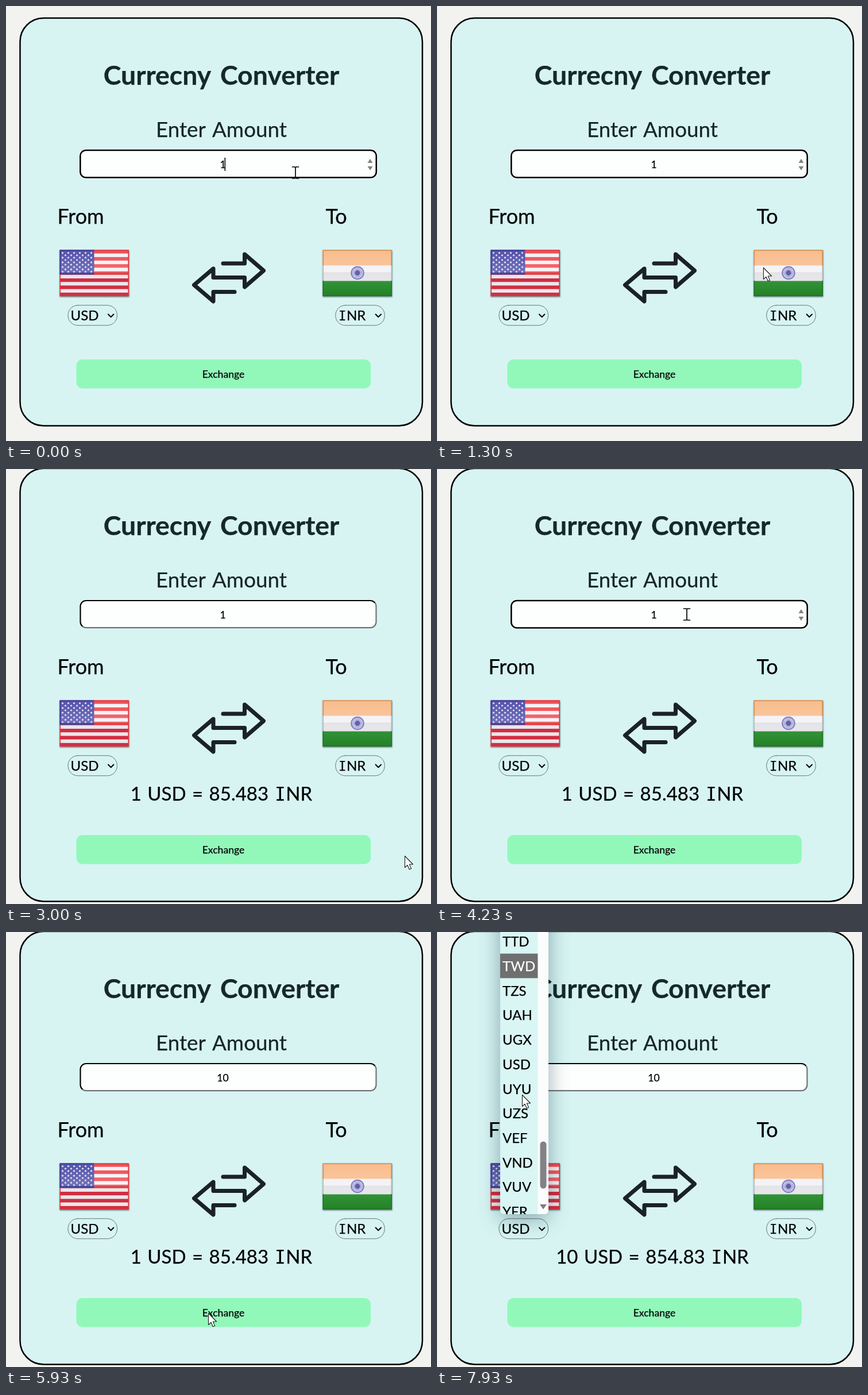
An HTML page that plays this animation: 740x757 px, repeating every 8 s.

```html
<!DOCTYPE html>
<html lang="en">
<head>
<meta charset="utf-8">
<title>Currency converter</title>
<style>
html, body { margin: 0; width: 100%; height: 100%; overflow: hidden; background: #f2f2f0; }
svg { display: block; width: 740px; height: 757px; }
text { font-family: Lato, "Open Sans", sans-serif; font-size: 24px; fill: #000; stroke: #000; stroke-width: .25px; stroke-linejoin: round; white-space: pre; }
.mid { text-anchor: middle; }
.title { font-size: 46.4px; font-weight: 700; word-spacing: .12em; fill: #16282c; stroke: #16282c; }
.label { font-size: 36.8px; word-spacing: .1em; fill: #16242a; stroke: #16242a; }
.side { font-size: 36px; }
.small { font-size: 17.6px; }
.result { font-size: 33px; word-spacing: .06em; }
.serif { font-family: "Noto Sans Mono", "DejaVu Sans Mono", monospace; }
.line { fill: none; stroke-linecap: round; stroke-linejoin: round; }
#popup { filter: drop-shadow(0 8px 18px rgba(0, 40, 50, .38)); }
</style>
</head>
<body>
<svg viewBox="0 0 740 757" xmlns="http://www.w3.org/2000/svg">
  <defs>
    <linearGradient id="gloss" x1="0" y1="0" x2="0" y2="1">
      <stop offset="0" stop-color="#fff" stop-opacity=".05"/>
      <stop offset=".48" stop-color="#fff" stop-opacity=".22"/>
      <stop offset=".5" stop-color="#000" stop-opacity=".05"/>
      <stop offset="1" stop-color="#000" stop-opacity=".03"/>
    </linearGradient>
    <linearGradient id="green" x1="0" y1="0" x2="0" y2="1">
      <stop offset="0" stop-color="#35993a"/>
      <stop offset="1" stop-color="#238526"/>
    </linearGradient>
    <filter id="soft" x="-10%" y="-10%" width="120%" height="120%"><feGaussianBlur stdDeviation="1.3"/></filter>
    <clipPath id="listClip"><rect x="110" y="-300" width="84" height="791" rx="7"/></clipPath>
  </defs>

  <g id="page">
    <rect id="card" x="24.5" y="21" width="700.5" height="709.5" rx="41" fill="#d7f4f3" stroke="#000" stroke-width="2.5"/>
    <text class="title mid" x="375" y="137">Currecny Converter</text>
    <text class="label mid" x="375" y="228">Enter Amount</text>

    <g id="focused">
      <rect x="127.2" y="248.7" width="519.8" height="52" rx="12" fill="#fff"/>
      <rect x="129.3" y="251" width="515.5" height="47.5" rx="10" fill="#fdfffe" stroke="#000" stroke-width="2.6"/>
    </g>
    <g id="blurred">
      <rect x="128.5" y="250" width="517" height="49" rx="11" fill="#fdfffe"/>
      <path class="line" stroke="#6f7372" stroke-width="2.2" d="M132.5 295.2A10 10 0 0 0 139.5 298.1H634.5A10 10 0 0 0 644.5 288.1V261A10 10 0 0 0 641.6 254"/>
      <path class="line" stroke="#000" stroke-width="2.2" d="M132.5 295.2A10 10 0 0 1 129.5 288.1V261A10 10 0 0 1 139.5 251H634.5A10 10 0 0 1 641.6 254"/>
    </g>
    <path id="spinner" fill="#838383" d="M629.5 273l4.5-7 4.5 7zM629.5 279l4.5 7 4.5-7z"/>
    <text id="amount" class="small mid" x="377.5" y="281.5"></text>
    <rect id="caret" y="264" width="1.6" height="23"/>

    <text class="side" x="89.5" y="379">From</text>
    <text class="side" x="556.5" y="379">To</text>

    <g id="us" transform="translate(93.5 424.5)">
      <rect x="0" y="1" width="121" height="81" fill="#3c4a50" opacity=".75" filter="url(#soft)"/>
      <rect width="120.5" height="80.5" fill="#f4f1f4"/>
      <g id="stripes"></g>
      <rect width="60" height="43" fill="#4a49a6"/>
      <g id="stars" fill="#eef0fa"></g>
      <rect width="120.5" height="80.5" fill="url(#gloss)"/>
      <path class="line" stroke="#38389a" stroke-width="1.6" d="M60 .8H.8V43"/>
      <path class="line" stroke="#e0353f" stroke-width="1.6" d="M60 .8H119.7V79.7H.8V43"/>
    </g>

    <g transform="translate(551.5 424.5)">
      <rect x="0" y="1" width="121" height="81" fill="#3c4a50" opacity=".75" filter="url(#soft)"/>
      <rect width="120.5" height="80.5" fill="#f1f1f5"/>
      <rect width="120.5" height="27" fill="#f8b987"/>
      <rect y="54" width="120.5" height="26.5" fill="url(#green)"/>
      <rect width="120.5" height="80.5" fill="url(#gloss)"/>
      <circle cx="60.5" cy="40" r="10.8" fill="#d9d9ee" stroke="#7d7dc0" stroke-width="2"/>
      <g id="spokes" stroke="#8c8cc8" stroke-width=".8"></g>
      <circle cx="60.5" cy="40" r="4.4" fill="#6060ad"/>
      <path class="line" stroke="#d68a4f" stroke-width="1.6" d="M.8 27V.8H119.7V27"/>
      <path class="line" stroke="#b9bbc2" stroke-width="1.6" d="M.8 28V53M119.7 28V53"/>
      <path class="line" stroke="#207523" stroke-width="1.6" d="M.8 54V79.7H119.7V54"/>
    </g>

    <path class="line" stroke="#1b2225" stroke-width="7" d="M378 448H415.5V432L448.5 460.5 415.5 489V472.5H361V457L327.5 485.5 361 514V497.5H398"/>

    <g id="selects" class="line" stroke="#000">
      <rect x="108" y="520.8" width="85.5" height="35" rx="17" stroke="#667573"/>
      <rect x="573.8" y="520.8" width="85.5" height="35" rx="17" stroke="#667573"/>
      <path stroke-width="2" d="M178 536.5l4.7 4.7 4.7-4.7M643.6 536.5l4.7 4.7 4.7-4.7"/>
    </g>
    <text x="112.5" y="547">USD</text>
    <text x="578.5" y="547"><tspan class="serif">I</tspan>NR</text>

    <text id="result" class="result mid" x="375" y="599"><tspan id="sum"></tspan><tspan class="serif">I</tspan>NR</text>
    <g id="low">
      <rect x="122.5" y="615" width="512.5" height="50.5" rx="11" fill="#92f8ba"/>
      <text class="small mid" x="378.5" y="646.5">Exchange</text>
    </g>
  </g>

  <g id="popup">
    <g clip-path="url(#listClip)">
      <rect x="110" y="-300" width="84" height="800" fill="#d9f5f4"/>
      <rect id="hover" x="110" width="66" height="42.7" fill="#6f6f6f"/>
      <g id="items"></g>
      <rect x="175.5" y="-300" width="19" height="800" fill="#fbfdfc"/>
      <rect id="thumb" x="179.5" width="11" height="82" rx="5.5" fill="#828287"/>
      <path fill="#7c7c80" d="M179 474h12l-6 8.5z"/>
    </g>
  </g>

  <path id="arrow" fill="#fff" stroke="#1a1a1a" stroke-width="1.1" stroke-linejoin="round" d="M.5 .5V20.5L5 16.3 8.3 23.8 11.6 22.4 8.4 15H14.6Z"/>
  <path id="beam" class="line" stroke="#000" stroke-width="1.7" d="M-5.5-10H-1.5L0-9 1.5-10H5.5M0-9V9M-5.5 10H-1.5L0 9 1.5 10H5.5"/>
</svg>
<script>
const LOOP = 8000;
const CLICK_1 = 2250, RESULT_1 = 2640, REFOCUS = 3430, TYPE_ZERO = 4500;
const CLICK_2 = 5890, RESULT_2 = 6300, OPEN_LIST = 7100, SCROLL = 7500;
const ROW = 42.7, SCROLL_PX = 223;
const codes = "THB TJS TMT TND TOP TRY TTD TWD TZS UAH UGX USD UYU UZS VEF VND VUV YER ZAR".split(" ");
const TWD = codes.indexOf("TWD"), USD = codes.indexOf("USD");

// time, x, y of the pointer
const path = [
  [0, 504, 290], [30, 504, 290], [830, 568, 455], [1800, 568, 455],
  [2200, 425, 648], [2450, 425, 648], [3000, 694, 673], [3400, 435, 253],
  [5700, 435, 253], [5870, 352, 663], [6400, 352, 663], [6960, 146, 511],
  [7150, 146, 511], [7450, 148, 283], [LOOP, 148, 283]
];

const $ = id => document.getElementById(id);
const show = (id, on) => $(id).setAttribute("visibility", on ? "visible" : "hidden");
const move = (id, x, y) => $(id).setAttribute("transform", `translate(${x} ${y})`);
const clamp = v => Math.max(0, Math.min(1, v));
const smooth = v => (1 - Math.cos(Math.PI * clamp(v))) / 2;

function add(parent, tag, attrs, text = "") {
  const el = document.createElementNS("http://www.w3.org/2000/svg", tag);
  for (const key in attrs) el.setAttribute(key, attrs[key]);
  el.textContent = text;
  return $(parent).appendChild(el);
}

function star(x, y, r) {
  return Array.from({ length: 10 }, (_, i) => {
    const a = i * Math.PI / 5, d = i % 2 ? r * .45 : r;
    return (x + d * Math.sin(a)).toFixed(2) + "," + (y - d * Math.cos(a)).toFixed(2);
  }).join(" ");
}

const band = 80.5 / 13;
for (let i = 0; i < 13; i += 2)
  add("stripes", "rect", { y: i * band, width: 120.5, height: band, fill: i < 7 ? "#f0434a" : "#d92f45" });
for (let row = 0; row < 9; row++)
  for (let col = row % 2; col < 11; col += 2)
    add("stars", "polygon", { points: star(5 + col * 5, 5.2 + row * 4.1, 2.3) });
for (let i = 0; i < 12; i++)
  add("spokes", "path", { d: "M60.5 30V50", transform: `rotate(${i * 15} 60.5 40)` });
const items = codes.map((code, i) => add("items", "text", { x: 114, y: (i - TWD) * ROW + 68 }, code));

function pointer(t) {
  const i = Math.max(1, path.findIndex(p => p[0] > t));
  const [t0, x0, y0] = path[i - 1], [t1, x1, y1] = path[i];
  const k = smooth((t - t0) / (t1 - t0));
  return [x0 + (x1 - x0) * k, y0 + (y1 - y0) * k];
}

function drawList(t, y) {
  show("popup", t >= OPEN_LIST);
  if (t < OPEN_LIST) return;
  const k = smooth((t - SCROLL) / 420);
  const shift = SCROLL_PX * (1 - k);
  let over = TWD;
  if (t < 7450) over = y > 475 ? USD : TWD + Math.round((y - 59 - shift) / ROW);
  move("items", 0, shift);
  $("hover").setAttribute("y", (over - TWD) * ROW + 37.6 + shift);
  $("thumb").setAttribute("y", 340.5 + 24 * k);
  items.forEach((el, i) => el.style.fill = el.style.stroke = i === over ? "#fff" : "#000");
}

function draw(t) {
  const [x, y] = pointer(t);
  const tall = t >= RESULT_1, lift = tall ? -22 : 0;
  const focus = t < CLICK_1 || (t >= REFOCUS && t < CLICK_2);
  const inside = x > 128 && x < 646 && y > 249 + lift && y < 300 + lift;
  const ten = t >= TYPE_ZERO;

  move("page", 0, lift);
  move("low", 0, tall ? 44 : 0);
  $("card").setAttribute("height", tall ? 753.5 : 709.5);
  show("focused", focus);
  show("blurred", !focus);
  show("spinner", focus || inside);
  show("caret", focus && (t < 30 || Math.floor(t / 500) % 2 === 1));
  $("caret").setAttribute("x", ten ? 387 : 380.5);
  $("amount").textContent = ten ? "10" : "1";
  show("result", tall);
  $("sum").textContent = t >= RESULT_2 ? "10 USD = 854.83 " : "1 USD = 85.483 ";
  drawList(t, y);

  show("beam", inside);
  show("arrow", !inside);
  move("beam", x, y);
  move("arrow", x, y);
}

const start = performance.now();
function tick() {
  draw((performance.now() - start) % LOOP);
  requestAnimationFrame(tick);
}
tick();
</script>
</body>
</html>
```
